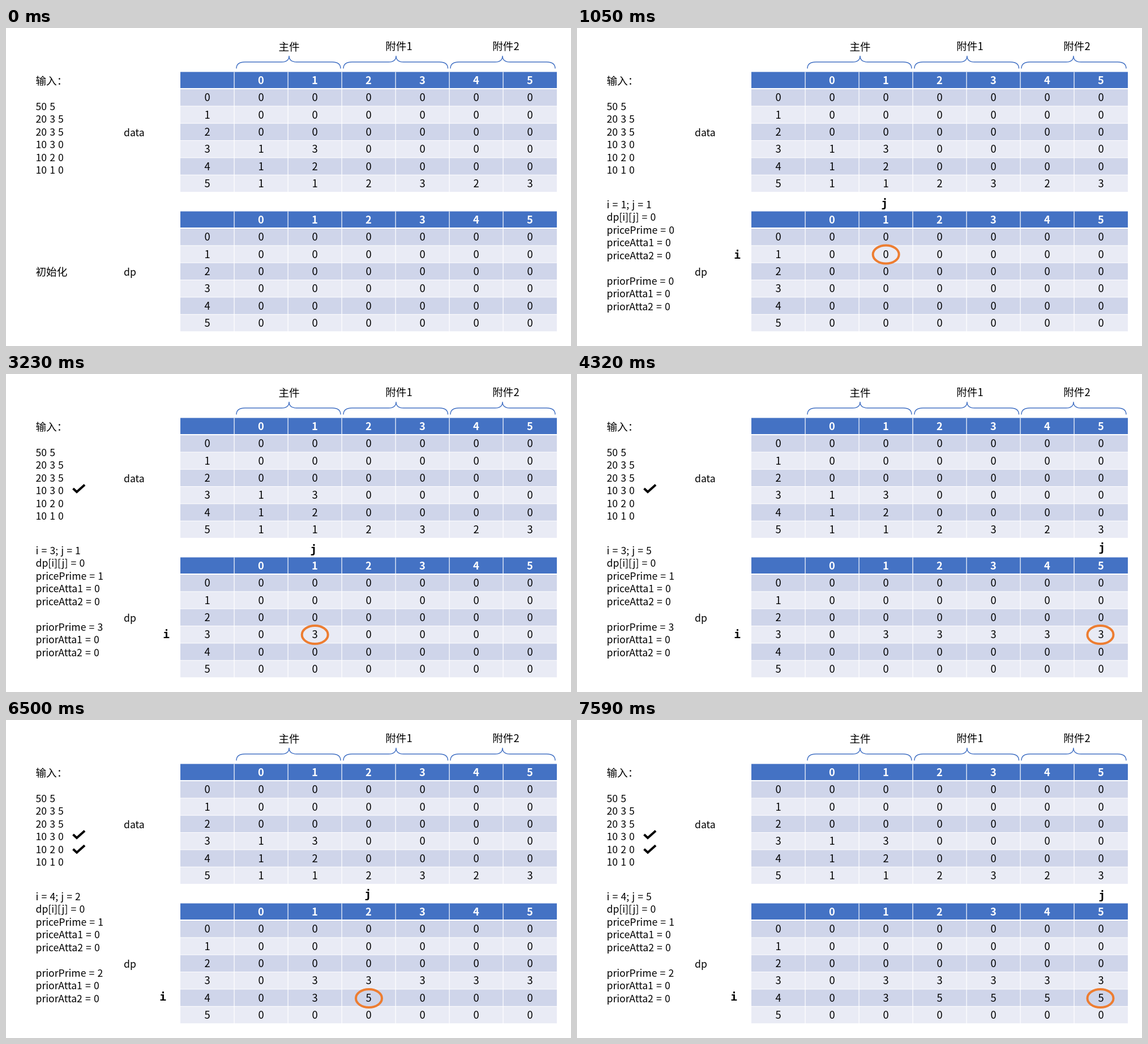
Recreate the animation shown at these times as an HTML page. Size 998 by 561 pixels, loop 8000 ms.

```html
<!DOCTYPE html>
<html lang="zh-CN">
<head>
<meta charset="utf-8">
<style>
  html, body { margin: 0; width: 100%; height: 100%; overflow: hidden; background: #fff; }
  svg { display: block; width: 100vw; height: 100vh; }
  text { font: 17.6px "Noto Sans CJK SC", "Noto Sans CJK", sans-serif; white-space: pre; word-spacing: 1.2px; }
  .label { font-size: 18.6px; font-weight: 500; }
  .cell { font-size: 18.4px; font-weight: 300; text-anchor: middle; }
  .head { font-size: 18.4px; font-weight: 700; text-anchor: middle; fill: #fff; }
  .mid { text-anchor: middle; }
  .index { font: bold 19.5px "DejaVu Sans Mono", monospace; text-anchor: middle; }
  .brace { fill: none; stroke: #4472c4; stroke-width: 1.4; }
  .ring { fill: none; stroke: #ed7d31; stroke-width: 4; }
  .check { fill: none; stroke: #000; stroke-width: 4; }
</style>
</head>
<body>
<svg id="stage" viewBox="0 0 998 561"></svg>
<script>
const LOOP = 8000;
const LEFT = 308, COL = 95, ROW = 30.35, LINE = 22.55, TEXT_X = 52.5;
const DATA_TOP = 77.5, DP_TOP = 323.5;

const data = [
  [0, 0, 0, 0, 0, 0],
  [0, 0, 0, 0, 0, 0],
  [0, 0, 0, 0, 0, 0],
  [1, 3, 0, 0, 0, 0],
  [1, 2, 0, 0, 0, 0],
  [1, 1, 2, 3, 2, 3],
];
const solved = { 3: [0, 3, 3, 3, 3, 3], 4: [0, 3, 5, 5, 5, 5] };

// iAt and jAt are the marker positions; checks counts the ticked items
const steps = [
  { start: 0 },
  { start: 1050, i: 1, j: 1, iAt: [283, 406.5], jAt: [543, 315.5], ring: [545.7, 399.5], checks: 0 },
  { start: 2140, i: 1, j: 2, iAt: [283, 406.5], jAt: [637, 313.5], ring: [641, 398], checks: 0 },
  { start: 3230, i: 3, j: 1, iAt: [283, 465.5], jAt: [543, 315.5], ring: [545.7, 460], checks: 1 },
  { start: 4320, i: 3, j: 5, iAt: [283, 465.5], jAt: [927, 312.5], ring: [924.5, 460], checks: 1 },
  { start: 5410, i: 4, j: 1, iAt: [277, 495], jAt: [543, 315.5], ring: [545.7, 490.5], checks: 1 },
  { start: 6500, i: 4, j: 2, iAt: [277, 495], jAt: [639, 313.5], ring: [641, 491], checks: 2 },
  { start: 7590, i: 4, j: 5, iAt: [277, 495], jAt: [927, 316], ring: [924.5, 491], checks: 2 },
];

const text = (x, y, str, cls = "") => `<text x="${x}" y="${y}" class="${cls}">${str}</text>`;
const rect = (x, y, w, h, fill) => `<rect x="${x}" y="${y}" width="${w}" height="${h}" fill="${fill}"/>`;
const lines = (y, list) => list.map((str, n) => text(TEXT_X, y + n * LINE, str)).join("");

function table(top, rows) {
  const center = c => LEFT + COL * (c + 0.5);
  const width = COL * 7;
  let out = rect(LEFT, top, width, 28.5, "#4472c4");
  rows.forEach((row, r) => {
    const y = top + 30.5 + r * ROW;
    out += rect(LEFT, y, width, ROW - 1, r % 2 ? "#e9ebf5" : "#cfd5ea");
    out += text(center(r + 1), top + 21.5, r, "head");
    [r, ...row].forEach((value, c) => out += text(center(c), y + 21.4, value, "cell"));
  });
  for (let c = 1; c < 7; c++) out += rect(LEFT + c * COL - 0.5, top, 1.2, 213, "#fff");
  return out;
}

function brace(x1, x2, tip) {
  const y = 60;
  return `<path class="brace" d="M${x1} 71.5 Q${x1} ${y} ${x1 + 15} ${y} H${tip - 13}
    Q${tip} ${y} ${tip} 49 Q${tip} ${y} ${tip + 13} ${y} H${x2 - 15} Q${x2} ${y} ${x2} 71.5"/>`;
}

function dpRows({ i = 0, j = 0 }) {
  return data.map((row, r) => row.map((_, c) =>
    solved[r] && (r < i || (r === i && c <= j)) ? solved[r][c] : 0));
}

function variables({ i, j }) {
  const price = i < 3 ? 0 : 1;
  const prior = { 3: 3, 4: 2 }[i] || 0;
  return lines(317.5, [
    `i = ${i}; j = ${j}`, "dp[i][j] = 0",
    `pricePrime = ${price}`, "priceAtta1 = 0", "priceAtta2 = 0", "",
    `priorPrime = ${prior}`, "priorAtta1 = 0", "priorAtta2 = 0",
  ]);
}

const fixed =
  text(500, 39.5, "主件", "label mid") + text(694, 39, "附件1", "label mid") +
  text(883, 39, "附件2", "label mid") +
  brace(407, 591, 500) + brace(596, 780.5, 689) + brace(785, 970, 877) +
  text(TEXT_X, 99.5, "输入：", "label") +
  lines(144.5, ["50 5", "20 3 5", "20 3 5", "10 3 0", "10 2 0", "10 1 0"]) +
  text(208, 190.5, "data") + text(208, 436.5, "dp") +
  table(DATA_TOP, data);

function scene(step) {
  let out = fixed + table(DP_TOP, dpRows(step));
  if (!step.i) return out + text(TEXT_X, 436.5, "初始化", "label");
  out += variables(step) + text(...step.iAt, "i", "index") + text(...step.jAt, "j", "index");
  for (let n = 0; n < step.checks; n++)
    out += `<path class="check" d="M118.5 ${202 + n * 25.7} l6.5 6 L139 ${195.5 + n * 25.7}"/>`;
  const [x, y] = step.ring;
  return out + `<ellipse class="ring" cx="${x}" cy="${y}" rx="23" ry="16"/>`;
}

const stage = document.getElementById("stage");
let shown;
function draw() {
  const time = performance.now() % LOOP;
  const step = steps.findLast(s => s.start <= time);
  if (step !== shown) stage.innerHTML = scene(shown = step);
  requestAnimationFrame(draw);
}
draw();
</script>
</body>
</html>
```
